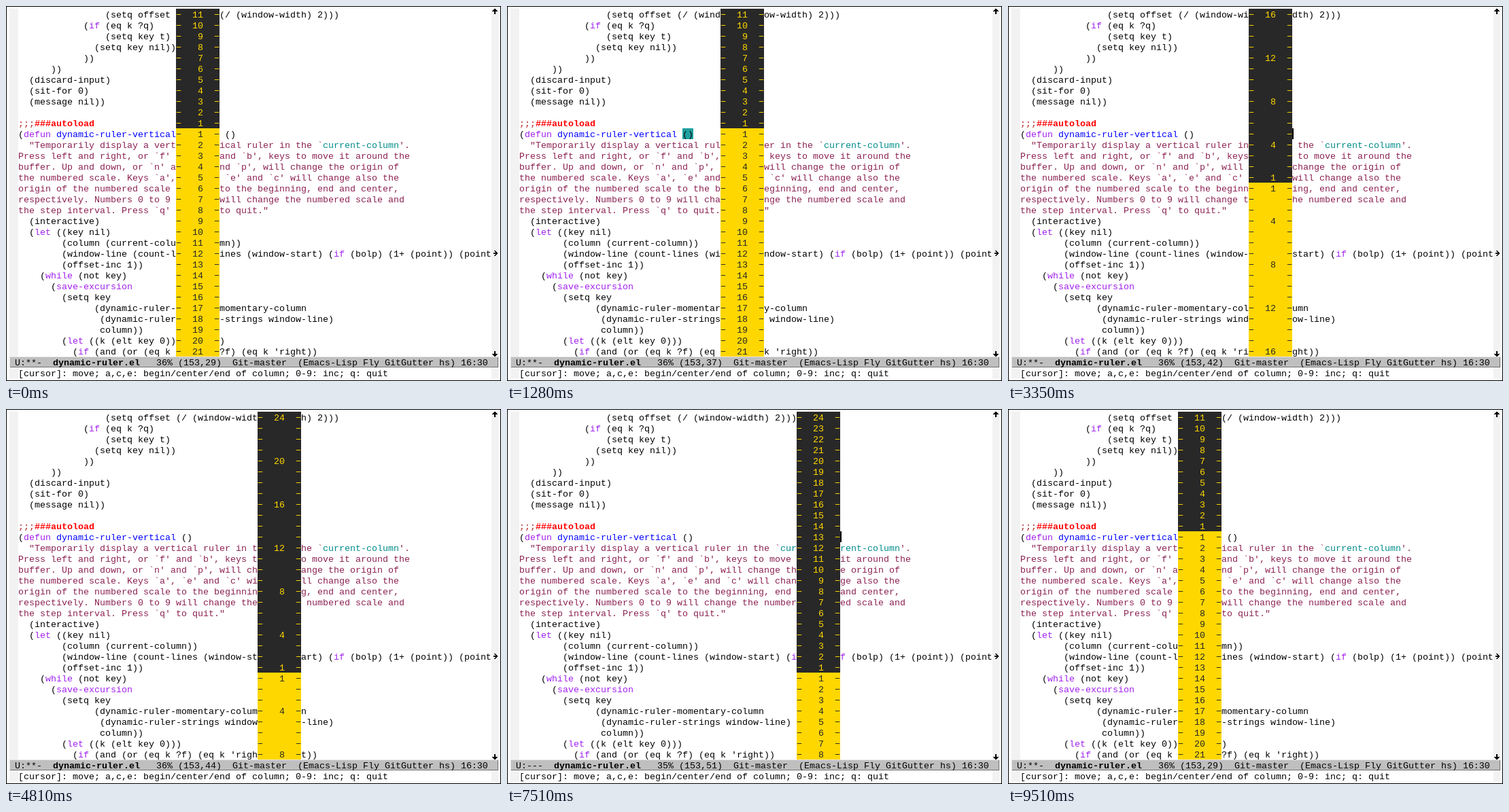
An HTML page that plays this animation: 728x552 px, repeating every 9760 ms.

```html
<!DOCTYPE html>
<html lang="en">
<head>
<meta charset="utf-8">
<title>Vertical ruler</title>
<style>
html, body { margin: 0; width: 100%; height: 100%; overflow: hidden; background: #fff; }
#stage {
  position: relative; width: 728px; height: 552px; overflow: hidden; background: #fff; color: #000;
  font: 13.333px/19px "Liberation Mono", monospace;
  font-variant-ligatures: none; font-kerning: none;
}
#stage div, #stage svg { position: absolute; }
.row { left: 18px; height: 16px; white-space: pre; }
.fringe { top: 4px; height: 544px; background: #f2f2f2; }
#frame { inset: 0; border: 1px solid #000; }
#mode {
  left: 5px; top: 516px; width: 719px; height: 16px; background: #bfbfbf; white-space: pre;
  box-shadow: inset 1px 1px #e5e5e5, inset -1px -1px #737373;
}
#ruler { top: 4px; width: 64px; height: 512px; }
#paren { left: 258px; top: 180px; width: 16px; height: 16px; background: #20a0a0; }
#cursor { top: 180px; height: 16px; background: #000; }
#prompt { left: 50px; top: 532px; width: 2px; height: 16px; background: #000; }
.k { color: #a020f0; } .f { color: #00f; } .s { color: #8b2252; } .c { color: #008b8b; }
.r { color: #b22222; } .w { color: #f00; font-weight: bold; } .p { color: #0000cd; }
.hi { color: #ffd700; } .lo { color: #282828; }
</style>
</head>
<body>
<div id="stage">
  <div class="fringe" style="left:5px;width:13px"></div>
  <div class="fringe" style="left:714px;width:10px"></div>
  <div id="ruler"></div>
  <div id="paren"></div>
  <div id="code"></div>
  <div id="cursor"></div>
  <div id="mode"></div>
  <div id="echo" class="row" style="top:532px"></div>
  <div id="prompt"></div>
  <svg width="728" height="552" shape-rendering="crispEdges">
    <path id="up" d="M718 4h2v1h1v1h1v1h1v1h-3v4h-2v-4h-3v-1h1v-1h1v-1h1z"/>
    <use href="#up" transform="translate(0 520) scale(1 -1)"/>
    <path id="more" d="M718 360h2v1h1v1h1v1h1v2h-1v1h-1v1h-1v1h-2v-1h1v-1h1v-1h-3v-2h3v-1h-1v-1h-1z"/>
  </svg>
  <div id="frame"></div>
</div>
<script>
const LOOP = 9760, LEFT = 18, CW = 8, RH = 16, COLS = 87;
const $ = id => document.getElementById(id);

// {x:text} marks a coloured run of class x
const SOURCE = `                (setq offset (/ (window-width) 2)))
            ({k:if} (eq k ?q)
                (setq key t)
              (setq key nil))
            ))
      ))
  (discard-input)
  (sit-for 0)
  (message nil))

{r:;;;}{w:###autoload}
({k:defun} {f:dynamic-ruler-vertical} ()
  {s:"Temporarily display a vertical ruler in the \`}{c:current-column}{s:'.}
{s:Press left and right, or \`f' and \`b', keys to move it around the}
{s:buffer. Up and down, or \`n' and \`p', will change the origin of}
{s:the numbered scale. Keys \`a', \`e' and \`c' will change also the}
{s:origin of the numbered scale to the beginning, end and center,}
{s:respectively. Numbers 0 to 9 will change the numbered scale and}
{s:the step interval. Press \`q' to quit."}
  (interactive)
  ({k:let} ((key nil)
        (column (current-column))
        (window-line (count-lines (window-start) ({k:if} (bolp) (1+ (point)) (point))))
        (offset-inc 1))
    ({k:while} (not key)
      ({k:save-excursion}
        (setq key
              (dynamic-ruler-momentary-column
               (dynamic-ruler-strings window-line)
               column))
        ({k:let} ((k (elt key 0)))
          ({k:if} (and (or (eq k ?f) (eq k 'right))`;

const cells = (text, cls = '') => [...text].map(ch => [ch, cls]);

const LINES = SOURCE.split('\n').map(line =>
  [...line.matchAll(/\{(\w):([^}]*)\}|[^{]+/g)]
    .flatMap(m => m[1] ? cells(m[2], m[1]) : cells(m[0])));

const rows = LINES.map((_, i) => {
  const row = document.createElement('div');
  row.className = 'row';
  row.style.top = 4 + i * RH + 'px';
  $('code').append(row);
  return row;
});

const KEYS = ' a,c,e: begin/center/end of column; 0-9: inc; q: quit';
const HELP = '[cursor]: move;' + KEYS;
const line = n => ({ echo: `window-line=${n},` + KEYS });
const brief = n => ({ echo: `window-line=${n}` });
const help = { echo: HELP };

// Held arrow key: the ruler advances on every 40 ms tick
const glide = (start, from, step, to, n) =>
  Array.from({ length: n }, (_, i) => {
    const col = Math.min(to, Math.floor(from + step * i));
    return [start + 40 * i, { col, cur: 0, paren: to === 42 && col > 33 }];
  });

const START = {
  col: 29, origin: 11, inc: 1, ruler: true, cur: 0, paren: false,
  flags: '**-', pct: 36, prompt: '', echo: HELP
};

const STEPS = [
  [0, {}],
  [460, { cur: 2 }],
  [920, { cur: 0, ...line(12) }],
  [960, { col: 30, ...help }],
  ...glide(1120, 31, 1.5, 42, 9),
  [1500, { paren: false, cur: 2 }],
  [1790, { cur: 0 }],
  [1830, line(13)],
  [1890, { origin: 12, ...help }],
  [2110, line(14)],
  [2150, { origin: 13, ...help }],
  [2300, line(15)],
  [2340, { origin: 14, ...help }],
  [2450, line(16)],
  [2490, { origin: 15, ...help }],
  [2600, brief(17)],
  [2640, { origin: 16, ...help }],
  [2680, { cur: 2 }],
  [2900, { cur: 0 }],
  [2940, line(17)],
  [2990, { inc: 4, ...help }],
  [3350, { cur: 2 }],
  [3630, line(21)],
  [3670, { origin: 20, ...help }],
  [3840, { cur: 0 }],
  [3880, { origin: 24 }],
  [4330, { col: 43 }],
  [4450, { cur: 2 }],
  [4590, { cur: 0, ...brief(25) }],
  [4630, { col: 44, cur: 2, ...help }],
  ...glide(4810, 44, 1.75, 51, 5),
  [5290, { cur: 2 }],
  [5800, { cur: 0 }],
  [6250, line(25)],
  [6290, { inc: 1, cur: 2, ...help }],
  [6790, { cur: 0 }],
  [7270, { cur: 2 }],
  [7510, { flags: '---', pct: 35 }],
  [7550, { ruler: false, col: 29, echo: '' }],
  [7760, { cur: 0 }],
  [8240, { cur: 1, prompt: 'M-x ' }],
  [8400, { echo: 'dynamic-ruler-vertical' }],
  [9010, { cur: 0, prompt: '', echo: '' }],
  [9050, { ...START, cur: 2 }],
  [9510, { cur: 0 }]
];

let last = START;
const STATES = STEPS.map(([at, change]) => (last = { ...last, ...change, at }));

// Join neighbouring cells of one class into spans
function fill(el, list) {
  el.textContent = '';
  let span = null;
  for (const [ch, cls] of list) {
    if (!span || span.className !== cls) {
      span = document.createElement('span');
      span.className = cls;
      el.append(span);
    }
    span.textContent += ch;
  }
}

function mark(row, { origin, inc }) {
  const above = row < origin;
  const n = above ? origin - row : row - origin + 1;
  const label = n === 1 || n % inc === 0 ? String(n) : '';
  return cells(`\u2212  ${label.padStart(2)}  \u2212`, above ? 'hi' : 'lo');
}

function drawCode(s) {
  let cut = false;
  LINES.forEach((src, i) => {
    let out = src;
    if (s.ruler) {
      const pad = cells(' '.repeat(Math.max(0, s.col - src.length)));
      out = [...src.slice(0, s.col), ...pad, ...mark(i, s), ...src.slice(s.col)];
    }
    cut = cut || out.length > COLS;
    fill(rows[i], out.slice(0, COLS));
  });
  $('more').style.display = cut ? '' : 'none';
}

const show = (el, on) => { el.style.display = on ? 'block' : 'none'; };

function draw(s) {
  const x = LEFT + CW * s.col, edge = s.origin * RH;
  drawCode(s);

  show($('ruler'), s.ruler);
  $('ruler').style.left = x + 'px';
  $('ruler').style.background = `linear-gradient(#282828 ${edge}px, #ffd700 ${edge}px)`;

  show($('cursor'), s.cur);
  $('cursor').style.left = x + (s.ruler ? 8 * CW : 0) + 'px';
  $('cursor').style.width = s.cur + 'px';

  show($('paren'), s.paren);
  show($('prompt'), s.prompt);
  fill($('echo'), [...cells(s.prompt, 'p'), ...cells(s.echo)]);
  $('mode').innerHTML = ` U:${s.flags}  <b>dynamic-ruler.el</b>   ${s.pct}% (153,${s.col})` +
    '  Git-master  (Emacs-Lisp Fly GitGutter hs) 16:30';
}

let shown = null;
function tick() {
  const t = performance.now() % LOOP;
  const state = STATES.findLast(s => s.at <= t);
  if (state !== shown) draw(shown = state);
  requestAnimationFrame(tick);
}
tick();
</script>
</body>
</html>
```
